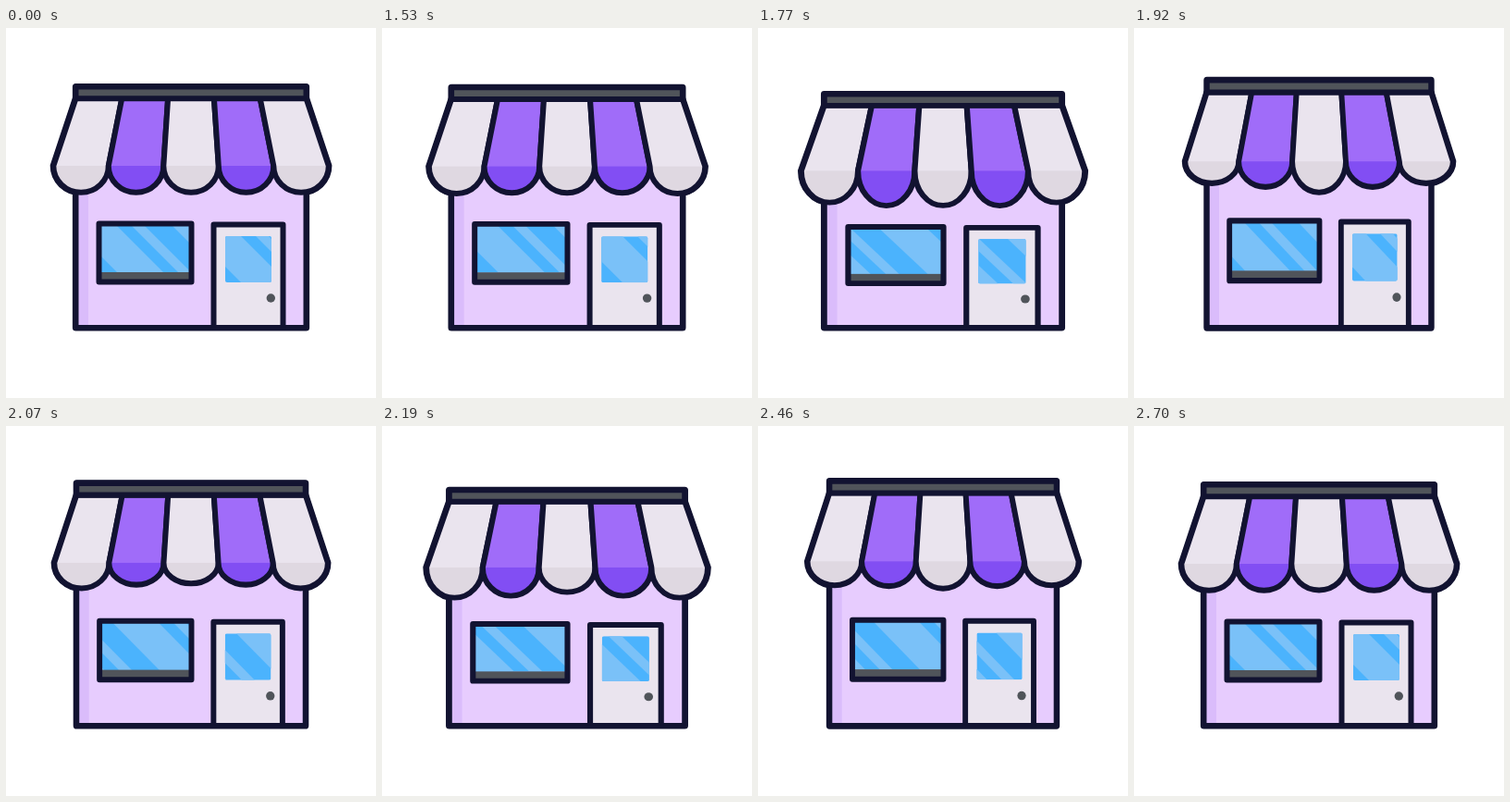
Animation, 400 px wide and 400 px high, one loop 2730 ms. Source, as an HTML page with a canvas:

```html
<!DOCTYPE html>
<html lang="en">
<head>
<meta charset="utf-8">
<title>Shop</title>
<style>
  html, body { margin: 0; width: 100%; height: 100%; overflow: hidden; background: #fff; }
  canvas { display: block; width: 400px; height: 400px; }
</style>
</head>
<body>
<canvas id="stage" width="400" height="400"></canvas>
<script>
const ctx = document.getElementById('stage').getContext('2d');
const LOOP = 2730;
const STEP = 30;
const GROUND = 325;
const SHINE_PERIOD = 110;
const INK = '#121331';
const GRAY = '#50545a';
const WHITE = { body: '#eae4ee', shade: '#dfd8e1' };
const PURPLE = { body: '#a06cf9', shade: '#824ef3' };

// Squash (positive) and stretch (negative) as [time, amount].
const bounce = [[1500, 0], [1680, 0.05], [1955, -0.03], [2200, 0.0225], [2455, -0.015], [2600, 0]];

function squashAt(t) {
  for (let i = 1; i < bounce.length; i++) {
    const [t0, a] = bounce[i - 1];
    const [t1, b] = bounce[i];
    if (t >= t0 && t < t1) {
      return a + (b - a) * (1 - Math.cos(Math.PI * (t - t0) / (t1 - t0))) / 2;
    }
  }
  return 0;
}

// The reflections pass three times, with a soft start and end.
function shineAt(t) {
  const p = Math.min(1, Math.max(0, (t - 1500) / 1200));
  const eased = (1 - Math.cos(Math.PI * p)) / 2;
  return 3 * SHINE_PERIOD * (0.7 * p + 0.3 * eased) % SHINE_PERIOD;
}

function fillRect(color, x, y, w, h) {
  ctx.fillStyle = color;
  ctx.fillRect(x, y, w, h);
}

function glass(x, y, w, h, radius, shift) {
  ctx.save();
  ctx.beginPath();
  ctx.roundRect(x, y, w, h, radius);
  ctx.clip();
  fillRect('#4bb3fd', x, y, w, h);
  ctx.fillStyle = '#7ac1f8';
  for (let start = shift - 2 * SHINE_PERIOD; start < 150; start += SHINE_PERIOD) {
    for (const [from, to] of [[-33, 17], [33, 47]]) {
      const left = x + start + from;
      const right = x + start + to;
      ctx.beginPath();
      ctx.moveTo(left, y);
      ctx.lineTo(right, y);
      ctx.lineTo(right + h, y + h);
      ctx.lineTo(left + h, y + h);
      ctx.fill();
    }
  }
  ctx.restore();
}

function panelPath(i, sag) {
  const top = 75.5 + i * 49.8;
  const left = 51.3 + i * 59.5;
  const path = new Path2D();
  path.moveTo(top, 76);
  path.lineTo(top + 49.8, 76);
  path.lineTo(left + 59.5, 149);
  path.ellipse(left + 29.75, 149, 29.75, 28.7 + sag, 0, 0, Math.PI);
  path.closePath();
  return path;
}

function drawPanel(path, color) {
  ctx.save();
  ctx.clip(path);
  fillRect(color.body, 40, 70, 320, 150);
  fillRect(color.shade, 40, 149, 320, 71);
  ctx.restore();
  ctx.stroke(path);
}

function draw(t) {
  const squash = squashAt(t);
  const shine = shineAt(t);
  ctx.setTransform(1, 0, 0, 1, 0, 0);
  fillRect('#fff', 0, 0, 400, 400);
  ctx.translate(200, GROUND);
  ctx.scale(1 + squash, 1 - squash);
  ctx.translate(-200, -GROUND);
  ctx.strokeStyle = INK;
  ctx.lineJoin = 'round';

  // Inner panels sway later than outer ones.
  const panels = [0, 1, 2, 3, 4].map(i => {
    const delay = 60 * (2 - Math.abs(i - 2));
    return panelPath(i, 215 * squashAt(t - delay));
  });

  // Slightly heavier outer silhouette
  ctx.lineWidth = 7.2;
  ctx.strokeRect(75.5, 63.5, 249, 260.5);
  ctx.stroke(panels[0]);
  ctx.stroke(panels[4]);
  ctx.lineWidth = 6;

  // Wall
  fillRect('#e7ccfe', 75.5, 76, 249, 248);
  fillRect('#dabcfb', 75.5, 76, 13.5, 248);
  ctx.strokeRect(75.5, 76, 249, 248);

  // Window
  glass(100.5, 211.5, 100, 53, 0, shine);
  fillRect(GRAY, 100.5, 264, 100, 10.5);
  ctx.strokeRect(100.5, 211.5, 100, 63);

  // Door
  fillRect(WHITE.body, 224.5, 212.5, 75, 111.5);
  glass(237, 225, 50, 50, 2, shine);
  ctx.strokeRect(224.5, 212.5, 75, 111.5);
  ctx.fillStyle = GRAY;
  ctx.beginPath();
  ctx.arc(286.3, 292, 4.7, 0, Math.PI * 2);
  ctx.fill();

  // Awning and its bar
  panels.forEach((path, i) => drawPanel(path, i % 2 ? PURPLE : WHITE));
  fillRect(GRAY, 75.5, 63.5, 249, 12.7);
  ctx.strokeRect(75.5, 63.5, 249, 12.7);
}

function frame(now) {
  const t = now % LOOP;
  draw(Math.floor(t / STEP) * STEP);
  requestAnimationFrame(frame);
}

draw(0);
requestAnimationFrame(frame);
</script>
</body>
</html>
```
